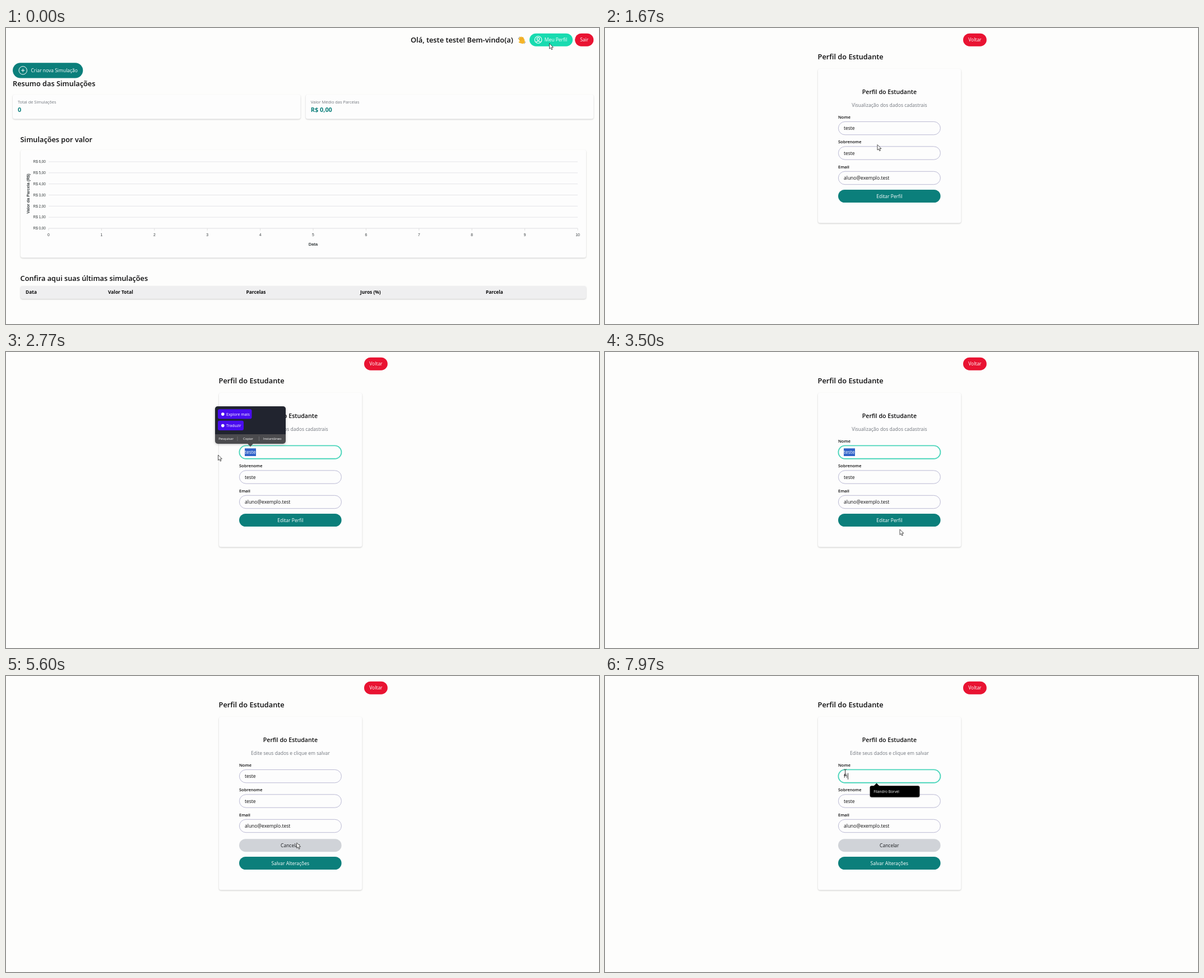
These frames come from a looping animation (1058x529 px, 8000 ms). An HTML page:

```html
<!DOCTYPE html>
<html lang="pt-BR">
<head>
<meta charset="utf-8">
<title>Perfil do Estudante</title>
<style>
  html, body { margin: 0; width: 100%; height: 100%; overflow: hidden; background: #fdfdfc; }
  svg { display: block; width: 100%; height: 100%; font-family: "Open Sans", "Noto Sans", sans-serif; }
  text { white-space: pre; }
  .card { fill: #fdfdfd; filter: drop-shadow(0 1px 1.3px rgba(0, 0, 0, .2)); }
  .axis { font-family: "Liberation Sans", Arial, sans-serif; fill: #373d3f; }
</style>
</head>
<body>
<svg id="stage" viewBox="0 0 1058 529"></svg>
<script>
const LOOP = 8000;
const TEAL = '#0b7f7b', MINT = '#18dbb0', RED = '#e91332', INK = '#0b0b0c', GRAY = '#70757d';
const NAME_X = 426;

// Markup helpers
const text = (x, y, s, size = 8.5, { fill = INK, weight = 400, anchor = 'start', extra = '' } = {}) =>
  `<text x="${x}" y="${y}" font-size="${size}" fill="${fill}" font-weight="${weight}" text-anchor="${anchor}" ${extra}>${s}</text>`;
const heading = (x, y, s, size = 12.75) => text(x, y, s, size, { weight: 600 });
const rect = (x, y, w, h, r, fill, extra = '') =>
  `<rect x="${x}" y="${y}" width="${w}" height="${h}" rx="${r}" fill="${fill}" ${extra}/>`;
const card = (x, y, w, h, id = '') => rect(x, y, w, h, 4, '#fdfdfd', `class="card" id="${id}"`);
const pill = (x, y, w, h, fill, label, color = '#fff', labelX = x + w / 2) =>
  rect(x, y, w, h, h / 2, fill) + text(labelX, y + h / 2 + 3.1, label, 8.5, { fill: color, anchor: 'middle' });
const group = (id, body) => `<g id="${id}">${body}</g>`;

function summary(x, label, value) {
  return card(x, 119, 513.5, 43.5) + text(x + 9, 134.6, label, 7.45, { fill: GRAY }) +
    text(x + 9, 149.8, value, 10.9, { fill: TEAL, weight: 700 });
}

function chart() {
  let out = card(26, 218, 1009, 192.5);
  for (let i = 0; i <= 6; i++) {
    const y = 358 - i * 19.83;
    out += `<path d="M76 ${y}H1020" stroke="${i ? '#e4e4e8' : '#dcdce0'}"/>` +
      text(70.8, y + 2.3, `R$ ${i},00`, 6.35, { fill: '#373d3f', anchor: 'end', extra: 'class="axis"' });
  }
  for (let i = 0; i <= 10; i++) {
    const x = 76 + i * 94.4;
    out += `<path d="M${x} 358v4" stroke="#e0e0e0"/>` +
      text(x, 372.2, i, 6.8, { anchor: 'middle', extra: 'class="axis"' });
  }
  const title = { weight: 700, anchor: 'middle' };
  return out + text(548, 388.7, 'Data', 7.6, { ...title, extra: 'class="axis"' }) +
    text(0, 0, 'Valor da Parcela (R$)', 7.2, { ...title, extra: 'class="axis" transform="translate(42.3 296) rotate(-90)"' });
}

function wavingHand() {
  return `<g transform="translate(920.5 22.3) rotate(-28)" stroke="#f5b62b" stroke-width="2.3" stroke-linecap="round">
    <path d="M-2.8 0V-4.6M-.6 0V-6.2M1.6 0V-5.8M3.6 1V-4M-3 3L-5.4 .4"/>
    <rect x="-3.4" y="-1" width="7.4" height="7" rx="3" fill="#f5b62b" stroke="none"/>
    <path d="M-1.7 -1V-4M.5 -1V-5M2.6 -1V-4" stroke="#d9912a" stroke-width=".5"/></g>
    <path d="M914 20q.3-3 2.6-4.2M926.8 24.5q-.5 2.8-2.8 3.8" fill="none" stroke="#7d8a94" stroke-width=".8"/>`;
}

function dashboard() {
  const columns = [[35, 'Data'], [182, 'Valor Total'], [428.5, 'Parcelas'], [632, 'Juros (%)'], [856, 'Parcela']];
  return text(722, 26.3, 'Olá, teste teste! Bem-vindo(a)', 12.85, { weight: 600 }) + wavingHand() +
    pill(934, 9.7, 77, 23, MINT, 'Meu Perfil', '#fff', 981) +
    `<g fill="none" stroke="#fff" stroke-width="1.1"><circle cx="949.6" cy="21" r="6.3"/>
      <circle cx="949.6" cy="19.4" r="2.3"/><path d="M945.6 25.4q4-4 8 0"/></g>` +
    pill(1015, 9.7, 33.3, 23, RED, 'Sair') +
    pill(12, 62.2, 125.3, 27.3, TEAL, 'Criar nova Simulação', '#fff', 86.2) +
    `<path d="M27.2 75.8h6M30.2 72.8v6" stroke="#fff"/><circle cx="30.2" cy="75.8" r="7.2" fill="none" stroke="#fff"/>` +
    heading(12, 104.2, 'Resumo das Simulações') +
    summary(12, 'Total de Simulações', '0') + summary(534.8, 'Valor Médio das Parcelas', 'R$ 0,00') +
    heading(25.6, 204.3, 'Simulações por valor') + chart() +
    heading(25.6, 452.3, 'Confira aqui suas últimas simulações') +
    rect(26, 461, 1009, 23, 4, '#efeff0', 'style="filter:drop-shadow(0 1px 1px rgba(0,0,0,.2))"') +
    columns.map(([x, s]) => text(x, 475.3, s, 8.4, { weight: 700 })).join('');
}

function field(y, label, value, id = '') {
  return text(416, y - 5.2, label, 7.5, { weight: 600 }) +
    rect(416.4, y + .4, 182, 23.4, 11.7, '#fdfdfd', `stroke="#b3b2cf" stroke-width=".9" id="${id}Box"`) +
    text(NAME_X, y + 15.2, value, 8.5, { extra: `id="${id}Text"` });
}

function popup() {
  const action = (y, w, s) => rect(378, y, w, 17.2, 3, '#4a0cf0') +
    `<circle cx="386.8" cy="${y + 8.8}" r="2.8" fill="#fff"/>` + text(393, y + 11.2, s, 7, { fill: '#fff' });
  const tool = (x, s) => text(x, 157.2, s, 5.9, { fill: '#fff', anchor: 'middle' });
  return rect(373, 97.3, 126, 66.7, 5, '#4b4b4e', 'style="filter:drop-shadow(0 1px 2px rgba(0,0,0,.25))"') +
    '<path d="M373 147V102.3q0-5 5-5H494q5 0 5 5V147Z" fill="#21242f"/>' +
    '<path d="M431 163.8h10l-5 5.4Z" fill="#4b4b4e"/>' +
    action(102.3, 60.5, 'Explore mais') + action(122.8, 46, 'Traduzir') +
    tool(392.6, 'Pesquisar') + tool(432, 'Copiar') + tool(475.2, 'Instantâneo') +
    '<path d="M413 151v8M451.5 151v8" stroke="#77777a" stroke-width=".8"/>';
}

function suggestions() {
  const item = (y, s, id) => text(479.3, y, s, 6.5, { fill: '#fff', extra: `id="${id}"` });
  return rect(472.7, 196.2, 88.6, 40.8, 3, '#000', 'id="list" style="filter:drop-shadow(0 1px 1px rgba(0,0,0,.25))"') +
    '<path d="M479 197l5.5-5.6L490 197Z"/>' + item(208.7, 'teste', 'first') + item(229.2, 'Teste', 'second');
}

function profile() {
  return pill(639, 9.7, 41.8, 23, RED, 'Voltar') +
    heading(379.6, 56.3, 'Perfil do Estudante') + card(380, 73, 255.3, 275.5, 'panel') +
    text(507.4, 118, 'Perfil do Estudante', 10.6, { weight: 600, anchor: 'middle' }) +
    text(507.4, 140.8, '', 8.55, { fill: GRAY, anchor: 'middle', extra: 'id="subtitle"' }) +
    field(167, 'Nome', 'teste', 'name') +
    `<clipPath id="selected"><rect id="selection" y="172.2" height="13.8"/></clipPath>` +
    `<g clip-path="url(#selected)">${rect(NAME_X, 172, 20, 14.2, 0, '#2f62c8')}${text(NAME_X, 182.2, 'teste', 8.5, { fill: '#fff' })}</g>` +
    text(0, 182.2, 'teste', 8.5, { fill: '#777', extra: 'id="ghost" opacity=".75"' }) +
    '<path id="caret" d="M433.6 173.5v11.5" stroke="#111" stroke-width=".8"/>' +
    field(211.4, 'Sobrenome', 'teste') + field(255.9, 'Email', 'aluno@exemplo.test') +
    group('viewButtons', pill(416, 289, 182.6, 23, TEAL, 'Editar Perfil')) +
    group('editButtons', pill(416, 291.2, 182.6, 23, '#d0d3d8', 'Cancelar', '#17191c') +
      pill(416, 323, 182.6, 23, TEAL, 'Salvar Alterações')) +
    group('popup', popup()) + group('suggestions', suggestions());
}

const stage = document.getElementById('stage');
stage.innerHTML = group('dashboard', dashboard()) + group('profile', profile()) +
  '<path id="arrow" d="M0 0V9.6L2.2 7.6 3.8 11.2 5.4 10.5 3.9 7H6.9Z" fill="#fff" stroke="#222" stroke-width=".8" stroke-linejoin="round"/>' +
  '<path id="beam" d="M-2.3-5.3H-.6L0-4.7 .6-5.3H2.3M0-4.7V4.7M-2.3 5.3H-.6L0 4.7 .6 5.3H2.3" fill="none" stroke="#222" stroke-width=".9"/>';

const $ = id => document.getElementById(id);
const show = (id, on) => { $(id).style.display = on ? '' : 'none'; };
const set = (id, attrs) => { for (const k in attrs) $(id).setAttribute(k, attrs[k]); };
const clamp = (v, lo = 0, hi = 1) => Math.min(hi, Math.max(lo, v));
const within = (t, a, b) => t >= a && t < b;
const progress = (t, a, b) => clamp((t - a) / (b - a));

// Pointer stops: time, x, y
const path = [
  [0, 969.5, 27.5], [30, 969.5, 27.5], [570, 946, 28.3], [830, 948, 26], [1330, 948, 26],
  [1620, 486, 208.5], [1700, 486, 208.5], [2070, 453, 180], [2170, 453, 180], [2470, 378.5, 184],
  [2970, 378.5, 184], [3030, 526, 317], [5200, 526, 317], [5380, 520, 303], [5560, 520, 303],
  [5900, 488, 180], [6390, 488, 180], [6391, 302, 180], [6500, 351.5, 180],
  [7320, 351.5, 180], [7400, 428.6, 172.3], [LOOP, 428.6, 172.3]
];

function pointerAt(t) {
  const i = path.findIndex(p => p[0] > t);
  const [t0, x0, y0] = path[i - 1], [t1, x1, y1] = path[i];
  const p = (t - t0) / (t1 - t0), k = p * p * (3 - 2 * p);
  return [x0 + (x1 - x0) * k, y0 + (y1 - y0) * k];
}

function render(t) {
  const onProfile = t >= 1330, editing = t >= 5500, typed = t >= 7960;
  const [x, y] = pointerAt(t);
  show('dashboard', !onProfile);
  show('profile', onProfile);

  set('panel', { height: editing ? 309.5 : 275.5 });
  $('subtitle').textContent = editing ? 'Edite seus dados e clique em salvar' : 'Visualização dos dados cadastrais';
  show('viewButtons', !editing);
  show('editButtons', editing);

  const focused = within(t, 2080, 5500) || t >= 5950;
  set('nameBox', { stroke: focused ? '#4bd5bb' : '#b3b2cf', 'stroke-width': focused ? 1.9 : .9 });
  $('nameText').textContent = typed ? 'Fi' : 'teste';
  show('caret', typed);

  let left = NAME_X + 20;
  if (within(t, 2170, 2470)) left = clamp(x, NAME_X, left);
  else if (within(t, 2470, 5500) || within(t, 6030, 7960)) left = NAME_X;
  set('selection', { x: left, width: NAME_X + 20 - left });

  show('ghost', within(t, 6190, 6480));
  set('ghost', { x: t < 6240 ? 417 : 417 - 136 * progress(t, 6240, 6390) });

  show('popup', within(t, 2560, 3500));
  $('popup').style.opacity = progress(t, 2540, 2640) * (1 - progress(t, 3370, 3500));

  show('suggestions', t >= 6130);
  set('list', { height: typed ? 20.3 : 40.8 });
  $('first').textContent = typed ? 'Filandro Borvel' : 'teste';
  show('second', !typed);

  const overField = onProfile && within(x, 416, 599) &&
    [167, 211.5, 256].some(top => within(y, top, top + 24));
  show('arrow', !overField);
  show('beam', overField);
  set(overField ? 'beam' : 'arrow', { transform: `translate(${x} ${y})` });
}

const start = performance.now();
function tick() {
  render((performance.now() - start) % LOOP);
  requestAnimationFrame(tick);
}
tick();
</script>
</body>
</html>
```
